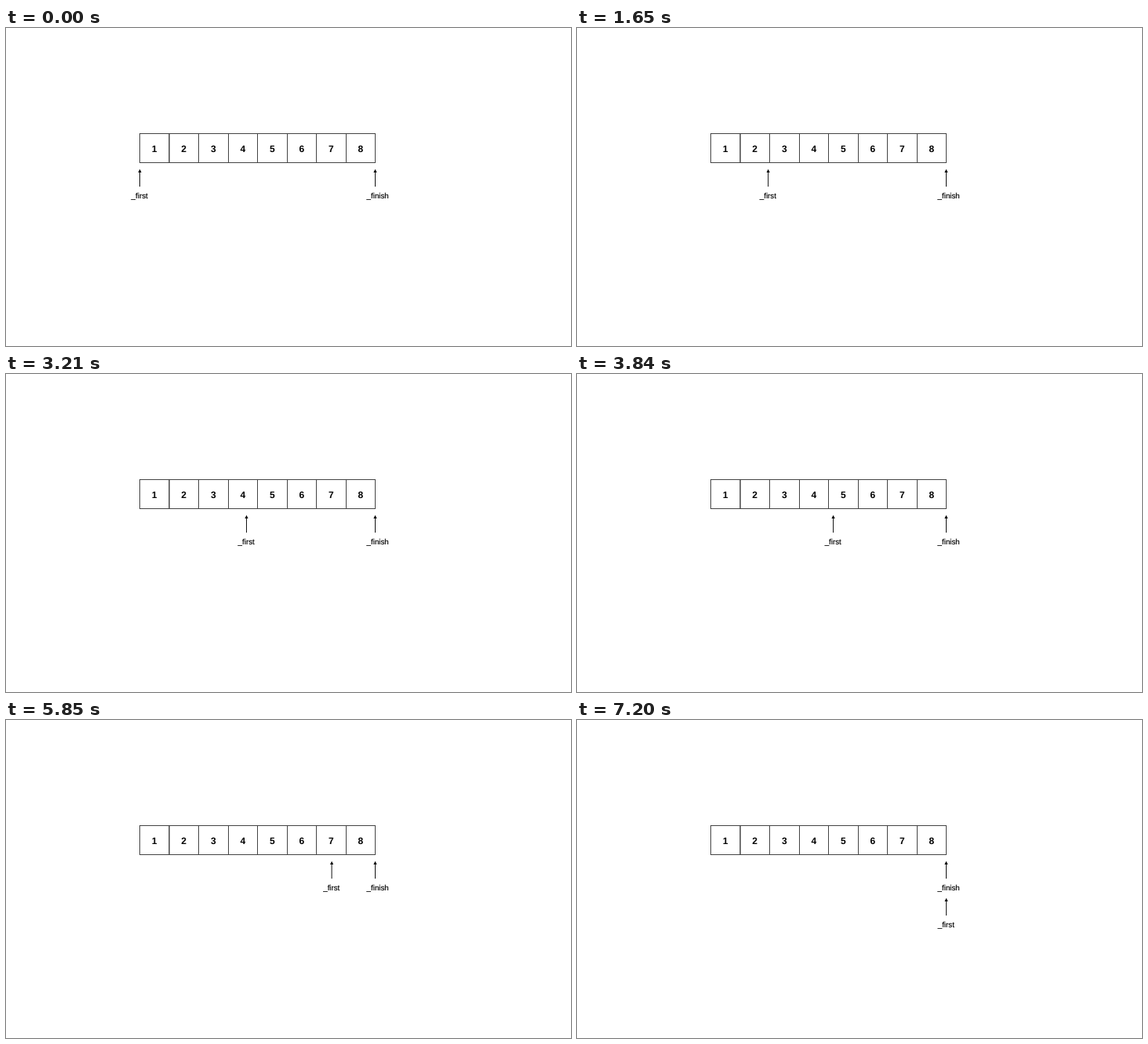
An HTML page for the animation above (7.68 s loop, 720 by 405 pixels).

```html
<!DOCTYPE html>
<html lang="en">
<head>
<meta charset="utf-8">
<title>Moving pointer</title>
<style>
  html, body { margin: 0; width: 100%; height: 100%; overflow: hidden; background: #fff; }
  svg { display: block; width: 720px; height: 405px; }
  text { font-family: "Liberation Sans", Arial, sans-serif; fill: #000; text-rendering: geometricPrecision; }
  .digit { font-size: 12px; font-weight: 700; text-anchor: middle; }
  .label { font-size: 9.75px; stroke: #000; stroke-width: .15px; }
  .grid { stroke: #444; fill: none; }
  .shaft { stroke: #111; }
</style>
</head>
<body>
<svg id="stage" viewBox="0 0 720 405"></svg>
<script>
const LOOP = 7680, TICK = 30, STEP = 900, STEPS = 8;
const EDGES = [170.5, 208, 245.5, 283.5, 320.5, 358.5, 395.5, 433.5, 470.5];
const TOP = 134.5, BOTTOM = 171.5;
const START = 170.5, PITCH = 37.63, END = 470.6, DROP = 47;
const stage = document.getElementById("stage");

function add(parent, tag, attrs, text) {
  const el = document.createElementNS("http://www.w3.org/2000/svg", tag);
  for (const key in attrs) el.setAttribute(key, attrs[key]);
  if (text) el.textContent = text;
  return parent.appendChild(el);
}

function addPointer(name) {
  const g = add(stage, "g", {});
  add(g, "path", { class: "shaft", d: "M0 183V202" });
  add(g, "path", { d: "M0 179.8L2.1 184H-2.1Z" });
  add(g, "text", { class: "label", x: -10.9, y: 217 }, name);
  return g;
}

function place(el, x, y) {
  el.setAttribute("transform", `translate(${x.toFixed(3)} ${y.toFixed(3)})`);
}

// Cubic ease-in-out with control points (.42, 0) and (.58, 1)
function ease(p) {
  let lo = 0, hi = 1;
  for (let i = 0; i < 24; i++) {
    const s = (lo + hi) / 2, r = 1 - s;
    if (3 * r * r * s * .42 + 3 * r * s * s * .58 + s * s * s < p) lo = s;
    else hi = s;
  }
  return lo * lo * (3 - 2 * lo);
}

const stopX = i => i === STEPS ? END : START + i * PITCH;

function draw(now) {
  const t = Math.floor((now % LOOP) / TICK) * TICK;
  const i = Math.min(Math.floor(t / STEP), STEPS - 1);
  const p = ease(Math.min(t / STEP - i, 1));
  const x = stopX(i) + (stopX(i + 1) - stopX(i)) * p;
  place(first, x, i === STEPS - 1 ? DROP * p : 0);
}

add(stage, "path", { class: "grid", d: `M170 ${TOP}H471M170 ${BOTTOM}H471` });
EDGES.forEach((x, i) => {
  add(stage, "path", { class: "grid", d: `M${x} ${TOP}V${BOTTOM}`, "stroke-width": i === 1 ? 1.5 : 1 });
  if (i < STEPS) add(stage, "text", { class: "digit", x: (x + EDGES[i + 1]) / 2 - .2, y: 157.8 }, String(i + 1));
});

place(addPointer("_finish"), 470.5, 0);
const first = addPointer("_first");

const origin = performance.now();
function frame() {
  draw(performance.now() - origin);
  requestAnimationFrame(frame);
}
frame();
</script>
</body>
</html>
```
